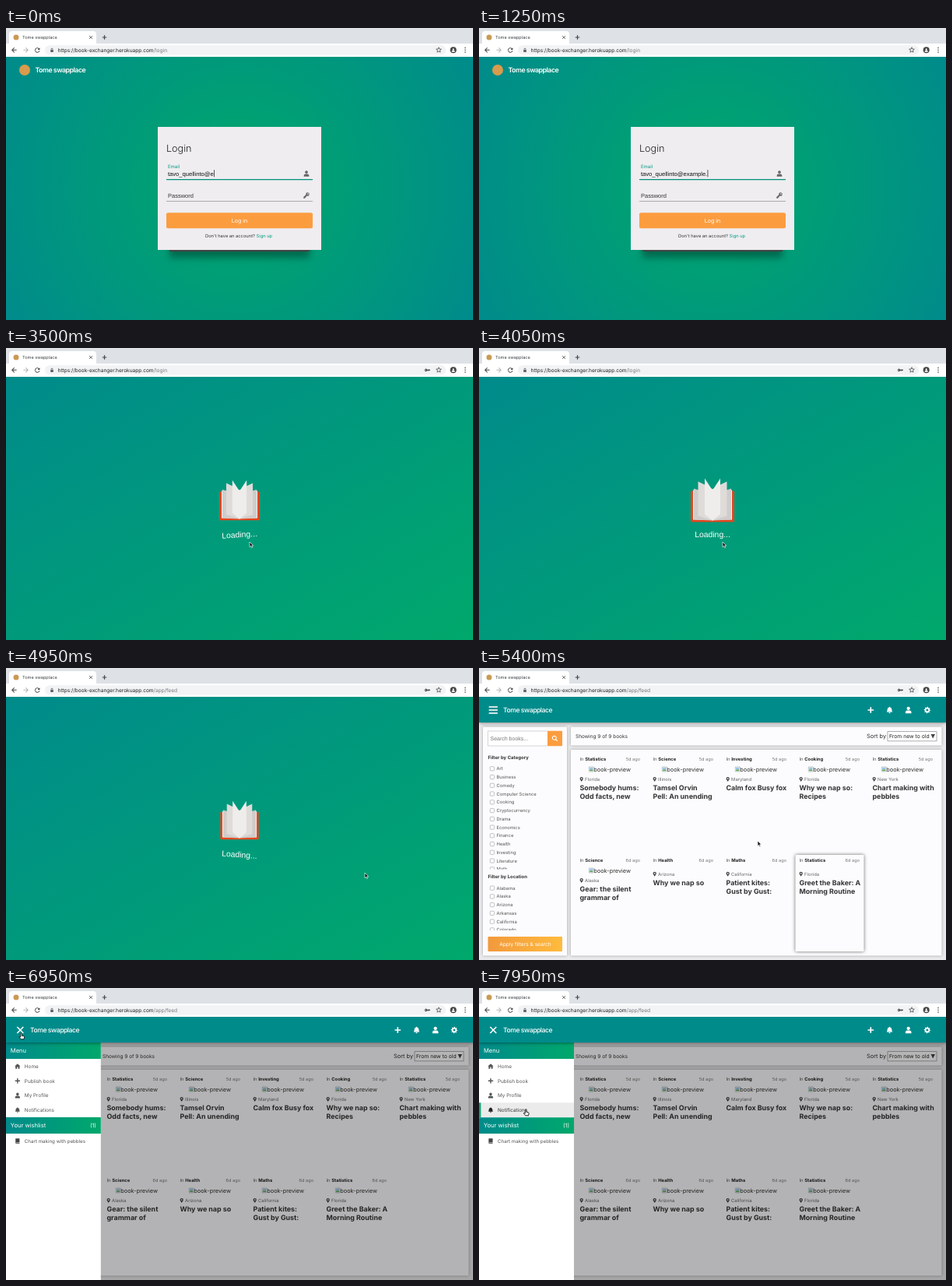
An HTML page with a canvas that plays this animation: 600x375 px, repeating every 8 s.

```html
<!DOCTYPE html>
<html lang="en">
<head>
<meta charset="utf-8">
<title>Tome swapplace</title>
<style>
html, body { margin: 0; width: 100%; height: 100%; overflow: hidden; }
canvas { display: block; width: 600px; height: 375px; }
</style>
</head>
<body>
<canvas id="stage"></canvas>
<script>
const LOOP = 8000;
const UI = 'Inter, sans-serif', FIELD = '"Liberation Sans", Arial, sans-serif';
const TEAL = '#008b8b', JADE = '#00a86b', ORANGE = '#fb9d3f', INK = '#333';
const BRAND = 'Tome swapplace', EMAIL = 'tavo_quellinto@example.com';

const canvas = document.getElementById('stage');
const c = canvas.getContext('2d');
const dpr = window.devicePixelRatio || 1;
canvas.width = 600 * dpr;
canvas.height = 375 * dpr;

const clamp = x => Math.max(0, Math.min(1, x));
const lerp = (a, b, p) => a + (b - a) * p;
const ease = x => { x = clamp(x); return x * x * (3 - 2 * x); };

const gearRim = Array.from({ length: 32 }, (_, i) => {
  const a = i * Math.PI / 16, r = i % 4 < 2 ? 5 : 3.7;
  return `${r * Math.cos(a)} ${r * Math.sin(a)}`;
}).join('L');
const starRim = Array.from({ length: 10 }, (_, i) => {
  const a = i * Math.PI / 5 - Math.PI / 2, r = i % 2 ? 2.2 : 5;
  return `${r * Math.cos(a)} ${r * Math.sin(a)}`;
}).join('L');

// Icons are drawn in a box from -5 to 5
const ICONS = {
  user: 'M0-5a2.5 2.5 0 1 1-.01 0zM-4.5 5V3.5q0-2.8 3-2.8h3q3 0 3 2.8V5z',
  bell: 'M0-5a.8.8 0 0 1 .8.9Q3.4-3.4 3.4-.5 3.4 2 4.4 3H-4.4Q-3.4 2-3.4-.5-3.4-3.4-.8-4.1A.8.8 0 0 1 0-5zM-1.3 3.6h2.6Q1.1 5 0 5T-1.3 3.6z',
  plus: 'M-1-4.5h2V-1h3.5v2H1v3.5h-2V1h-3.5v-2H-1z',
  home: 'M0-4.5L5.2 0H3.8V4.5H1V1.5h-2v3h-2.8V0h-1.4z',
  pin: 'M0 5C-1 3-3.6 1-3.6-1.5a3.6 3.6 0 0 1 7.2 0C3.6 1 1 3 0 5zM0-2.8a1.3 1.3 0 1 0 .01 0z',
  key: 'M2-5a3 3 0 1 1-1.2 5.8L-1 2.6v1.2h-1.3V5H-5V2.6L-.8-1.4A3 3 0 0 1 2-5zM2.6-3.6a1 1 0 1 0 .01 0z',
  gear: `M${gearRim}zM0-1.7a1.7 1.7 0 1 0 .01 0z`,
  star: `M${starRim}z`,
  search: 'M-1-5a4 4 0 1 0 .01 0zM-1-3.5a2.5 2.5 0 1 1-.01 0zM1.2 2.3l1.1-1.1L5 3.9 3.9 5z',
  lock: 'M-2.2-.5V-2a2.2 2.2 0 0 1 4.4 0v1.5H3v5h-6v-5zM-1.2-.5h2.4V-2a1.2 1.2 0 0 0-2.4 0z',
  book: 'M-4-4.5q0-.5.8-.5H4v8.2h-7V4h7v1h-7.2Q-4 5-4 4z',
  back: 'M4.5-.7v1.4h-6.8L.8 3.8l-1 1L-5 0l4.8-4.8 1 1-3.1 3.1z',
  reload: 'M4.5-4.5V-.4H.4l1.7-1.7A3.2 3.2 0 1 0 3 1.2h1.5A4.6 4.6 0 1 1 3.1-3.1z',
  arrow: 'M0 0v7l1.6-1.5L2.7 8l1.2-.5-1.1-2.4H5z',
  hand: 'M-.7 4.5V.1a.8.8 0 0 1 1.6 0v2.6l2.6.6q.7.3.6 1.1l-.6 2.9H-.3l-2.4-3q.5-1 2 .2z'
};
for (const name in ICONS) ICONS[name] = new Path2D(ICONS[name]);

function at(x, y, paint, scale = 1, angle = 0) {
  c.save();
  c.translate(x, y);
  c.rotate(angle);
  c.scale(scale, scale);
  paint();
  c.restore();
}

function icon(name, x, y, size, fill, stroke, width = 1) {
  at(x, y, () => {
    if (fill) { c.fillStyle = fill; c.fill(ICONS[name], 'evenodd'); }
    if (stroke) { c.strokeStyle = stroke; c.lineWidth = width; c.stroke(ICONS[name]); }
  }, size / 10);
}

// y is the middle of the capitals
function text(s, x, y, size, color, { weight = 400, font = UI, align = 'left', spacing = 0 } = {}) {
  c.font = `${weight} ${size}px ${font}`;
  c.letterSpacing = spacing + 'px';
  c.textAlign = align;
  c.fillStyle = color;
  c.fillText(s, x, y + size * .36);
  return c.measureText(s).width;
}

function rect(x, y, w, h, fill, radius = 0, stroke) {
  c.beginPath();
  c.roundRect(x, y, w, h, radius);
  if (fill) { c.fillStyle = fill; c.fill(); }
  if (stroke) { c.strokeStyle = stroke; c.lineWidth = .6; c.stroke(); }
}

function line(color, width, ...points) {
  c.beginPath();
  for (let i = 0; i < points.length; i += 2) c.lineTo(points[i], points[i + 1]);
  c.strokeStyle = color;
  c.lineWidth = width;
  c.stroke();
}

function dot(x, y, r, fill) {
  c.beginPath();
  c.arc(x, y, r, 0, 7);
  c.fillStyle = fill;
  c.fill();
}

function shadowed(color, blur, dy, paint) {
  c.save();
  c.shadowColor = color;
  c.shadowBlur = blur * dpr;
  c.shadowOffsetY = dy * dpr;
  paint();
  c.restore();
}

function gradient(g, from, to) {
  g.addColorStop(0, from);
  g.addColorStop(1, to);
  return g;
}

function browser(t) {
  rect(0, 0, 600, 20, '#dee1e6');
  rect(4, 4, 112, 20, '#fff', 4);
  rect(0, 20, 600, 17, '#fff');
  dot(13, 12, 3.5, '#c99a55');
  text(BRAND, 21, 12, 5.6, '#3c4043');
  line('#555', .8, 107, 10, 111, 14);
  line('#555', .8, 111, 10, 107, 14);
  icon('plus', 126.5, 12, 6, '#444');
  icon('back', 10.5, 28.3, 7, '#444');
  at(25.5, 28.3, () => icon('back', 0, 0, 7, '#b5b7ba'), 1, Math.PI);
  icon('reload', 40.3, 28.3, 7, '#444');
  rect(50, 22.3, 515, 12, '#f1f3f4', 6);
  icon('lock', 59, 28.3, 6, '#5f6368');
  const host = 'https://book-exchanger.herokuapp.com';
  const w = text(host, 66.5, 28.3, 6.57, '#222');
  text(t < 4450 ? '/login' : '/app/feed', 66.5 + w, 28.3, 6.57, '#77797d');
  if (t >= 2700) at(541, 28.3, () => icon('key', 0, 0, 5.8, '#444'), 1, Math.PI * 1.25);
  icon('star', 556, 28.3, 7, null, '#444', 1.1);
  dot(574.7, 28.3, 4, '#444');
  icon('user', 574.7, 28.5, 4.4, '#fff');
  for (const dy of [-2.8, 0, 2.8]) dot(590, 28.3 + dy, .8, '#444');
}

function loginPage(t) {
  rect(0, 37, 600, 338, gradient(c.createRadialGradient(300, 206, 0, 300, 206, 344), JADE, TEAL));
  dot(24, 54, 7, '#d99b4d');
  text(BRAND, 37.5, 54, 8.8, '#fff', { weight: 600, spacing: -.5 });
  shadowed('rgba(0,0,0,.35)', 9, 8, () => rect(210, 250, 180, 37, '#444'));
  rect(195, 127, 210, 158, '#efedf0');
  text('Login', 206, 154.5, 12.6, '#222', { weight: 300 });

  const typed = 16 + Math.floor(clamp((t - 50) / 1550) * 10);
  text('Email', 208, 177.5, 6, '#009b80');
  const emailWidth = text(EMAIL.slice(0, typed), 208, 187, 7.58, '#111', { font: FIELD });
  icon('user', 386, 187, 7.5, '#666');
  line('#008f78', 1.2, 206, 194.7, 394, 194.7);

  const focused = t >= 2250, float = ease((t - 2250) / 140);
  const labelColor = focused ? '#009b80' : INK;
  text('Password', 208, lerp(215.5, 209, float), lerp(7.5, 6.1, float), labelColor, { font: FIELD });
  const bullets = Math.floor(clamp((t - 2600) / 600) * 10);
  for (let i = 0; i < bullets; i++) dot(210 + i * 3.6, 216, 1.3, '#111');
  icon('key', 386, 215, 7.5, '#666');
  line(focused ? '#008f78' : '#999', focused ? 1.1 : .8, 206, 222.5, 394, 222.5);

  const typing = t < 1600 || t > 2600 && t < 3200;
  if (typing || (t - (focused ? 2250 : 1600)) % 1000 < 500) {
    if (focused) rect(208.4 + bullets * 3.6, 210, .7, 9, '#111');
    else rect(208.4 + emailWidth, 182.3, .7, 9, '#111');
  }

  rect(206, 237.3, 188, 20, ORANGE, 2);
  text('Log in', 300, 247.3, 7.1, '#fff', { align: 'center' });
  const w = text("Don't have an account? ", 256, 267, 5.75, INK);
  text('Sign up', 256 + w, 267, 5.75, '#009b80');
}

function loadingPage(t) {
  // Corner to corner, with the middle colour on the other diagonal
  const k = 600 * 338 / (600 ** 2 + 338 ** 2);
  rect(0, 37, 600, 338, gradient(
    c.createLinearGradient(300 - 338 * k, 206 - 600 * k, 300 + 338 * k, 206 + 600 * k), TEAL, JADE));
  const phase = (t - 4050) / 1800 * Math.PI * 2;
  const pages = [['#cfcccb', 24, -15, 3, -8, 25], ['#dedbd9', 18.5, -24, 6, -18, 20], ['#efedeb', 10, -28, 1.5, -15, 18]];
  at(300, 195.5, () => {
    rect(-28, -12, 56, 40, '#e5461f', 1);
    rect(-25, -13, 50, 38, '#f5f1ee');
    for (const [fill, x, top, inner, dip, bottom] of pages) {
      for (const side of [-1, 1]) {
        c.beginPath();
        c.moveTo(side * x, top);
        c.lineTo(side * inner, dip);
        c.lineTo(0, -14);
        c.lineTo(0, 26);
        c.lineTo(side * x, bottom);
        c.closePath();
        c.fillStyle = fill;
        c.fill();
      }
    }
  }, .94 + .06 * Math.cos(phase));
  at(300, 239.5, () => text('Loading...', 0, 0, 10.4, '#fff', { font: FIELD, align: 'center' }),
    1, Math.sin(phase / 2) * .075);
}

const CATEGORIES = ['Art', 'Business', 'Comedy', 'Computer Science', 'Cooking', 'Cryptocurrency', 'Drama',
  'Economics', 'Finance', 'Health', 'Investing', 'Literature', 'Math'];
const STATES = ['Alabama', 'Alaska', 'Arizona', 'Arkansas', 'California', 'Colorado'];
const BOOKS = [
  ['Statistics', 'Florida', 'Somebody hums:', 'Odd facts, new'],
  ['Science', 'Illinois', 'Tamsel Orvin', 'Pell: An unending'],
  ['Investing', 'Maryland', 'Calm fox Busy fox', ''],
  ['Cooking', 'Florida', 'Why we nap so:', 'Recipes'],
  ['Statistics', 'New York', 'Chart making with', 'pebbles'],
  ['Science', 'Alaska', 'Gear: the silent', 'grammar of'],
  ['Health', 'Arizona', 'Why we nap so', ''],
  ['Maths', 'California', 'Patient kites:', 'Gust by Gust:'],
  ['Statistics', 'Florida', 'Greet the Baker: A', 'Morning Routine']
];

function panel(x, y, w, h) {
  shadowed('rgba(0,0,0,.35)', 3.5, 0, () => rect(x, y, w, h, '#fcfbfd', 1));
}

function checklist(title, y, items, bottom) {
  text(title, 11.5, y, 6, INK, { weight: 700 });
  c.save();
  c.beginPath();
  c.rect(5, y, 108, bottom - y);
  c.clip();
  items.forEach((item, i) => {
    const rowY = y + 14.6 + i * 10.75;
    rect(14.3, rowY - 2.6, 5.2, 5.2, '#fff', 1, '#999');
    text(item, 22.5, rowY, 5.85, '#555');
  });
  c.restore();
}

function bookCard(t, [category, place, ...title], i) {
  const x = 129.5 + i % 5 * 94, y = i < 5 ? 0 : 130;
  if (i === 8) {
    c.save();
    c.globalAlpha = clamp((t - 5150) / 150) * clamp((5580 - t) / 150);
    shadowed('rgba(0,0,0,.6)', 4, 0, () => rect(406.5, 240, 88, 124, '#fcfbfd', 1));
    c.restore();
  }
  const w = text('In ', x, 116.5 + y, 5.9, '#555');
  text(category, x + w, 116.5 + y, 5.9, '#222', { weight: 700 });
  text(i < 5 ? '5d ago' : '6d ago', x + 77.5, 116.5 + y, 5.6, '#777', { align: 'right' });
  const hasPreview = t >= 5120 + i * 50;
  if (hasPreview) {
    rect(x + 11.8, 127 + y, 5.6, 6, '#fff', 0, '#9aa');
    rect(x + 12.6, 127.8 + y, 4, 2.4, '#9cc3ee');
    rect(x + 12.6, 130.4 + y, 4, 1.8, '#5aa55a');
    text('book-preview', x + 17.8, 130 + y, 7.35, INK);
  }
  const top = y - (hasPreview ? 0 : 8.3);
  icon('pin', x + 2.2, 143 + top, 6, '#444');
  text(place, x + 6.6, 143.2 + top, 5.85, '#666');
  title.forEach((row, n) => text(row, x, 154.2 + top + n * 10.4, 8.9, INK, { weight: 700 }));
}

const MENU = [['home', 'Home'], ['plus', 'Publish book'], ['user', 'My Profile'], ['bell', 'Notifications']];

function menu(open, pointer) {
  at(-122 * (1 - open), 0, () => {
    rect(0, 70, 122, 305, '#fff');
    const band = gradient(c.createLinearGradient(0, 0, 122, 0), TEAL, JADE);
    rect(0, 70, 122, 21, band);
    rect(0, 166, 122, 21, band);
    text('Menu', 6, 80.7, 7.6, '#fff');
    text('Your wishlist', 6, 176.7, 7.6, '#fff');
    text('(1)', 116, 176.5, 7, '#fff', { align: 'right' });
    MENU.forEach(([name, label], i) => {
      const y = 100.5 + i * 18.75;
      const hover = open === 1 && Math.abs(pointer.y - y) < 9.37;
      if (hover) {
        rect(0, y - 9.4, 122, 18.8, '#ebebeb');
        rect(0, y - 9.4, 2.4, 18.8, JADE);
      }
      icon(name, 15, y, 7, hover ? '#222' : '#555');
      text(label, 24, y, 6.4, hover ? '#333' : '#555');
    });
    icon('book', 15, 196.5, 6.5, '#444');
    text('Chart making with pebbles', 24, 196.5, 6.2, '#555');
  });
}

function feedPage(t, pointer) {
  rect(0, 37, 600, 338, '#ebeaec');
  panel(5, 75.5, 108, 294);
  panel(118, 75.5, 476.5, 24);
  panel(118, 105, 476.5, 264.5);

  rect(11.5, 81, 77, 19, '#fff', 0, '#bbb');
  text('Search books...', 14.5, 90.5, 7, '#777', { font: FIELD });
  rect(88, 80.8, 19, 19.4, ORANGE, 1);
  icon('search', 97.5, 90.5, 7.5, '#fff');
  checklist('Filter by Category', 114.7, CATEGORIES, 258.5);
  checklist('Filter by Location', 268, STATES, 337);
  rect(11.5, 345, 95.5, 19, gradient(c.createLinearGradient(11, 0, 107, 0), '#f2993c', '#ffbb3d'), 1);
  text('Apply filters & search', 59.5, 354.6, 6.6, '#fff', { align: 'center' });

  text('Showing 9 of 9 books', 124, 87.5, 6.5, INK);
  text('Sort by', 498, 87.5, 7.4, INK);
  rect(525, 81.5, 63, 12.3, '#fff', 0, '#777');
  text('From new to old', 527, 87.6, 6.8, '#222');
  c.beginPath();
  c.moveTo(580.5, 85); c.lineTo(586, 85); c.lineTo(583.2, 90.5);
  c.fillStyle = '#444';
  c.fill();
  BOOKS.forEach((book, i) => bookCard(t, book, i));

  const open = ease((t - 6500) / 460);
  rect(0, 70, 600, 305, `rgba(0,0,0,${.29 * open})`);
  if (open > 0) menu(open, pointer);

  shadowed('rgba(0,0,0,.4)', 4, 1, () => rect(0, 37, 600, 33, TEAL));
  for (const side of [-1, 0, 1]) {
    const fade = side ? 1 : 1 - open;
    at(18.3, 54 + side * 4 * (1 - open),
      () => line(`rgba(255,255,255,${fade})`, 1.6, -5.6, 0, 5.6, 0), 1, (side || 1) * -open * Math.PI / 4);
  }
  text(BRAND, 31, 54, 8.6, '#fff', { weight: 500, spacing: -.45 });
  ['plus', 'bell', 'user', 'gear'].forEach((name, i) => icon(name, 503.3 + i * 24.2, 54, 8.5, '#fff'));
}

// Pointer stops: time, x, y
const STOPS = [[1850, 340, 262], [2200, 234, 218], [3200, 234, 218], [3420, 313, 249], [4150, 313, 249],
  [4850, 461, 263], [5000, 461, 263], [5200, 452, 300], [5400, 358, 222], [5950, 19.5, 58.5],
  [7100, 19.5, 58.5], [7900, 60, 156.5], [8000, 60, 156.5]];

function pointerAt(t) {
  const i = Math.max(1, STOPS.findIndex(s => s[0] > t));
  const [t0, x0, y0] = STOPS[i - 1], [t1, x1, y1] = STOPS[i];
  const p = ease((t - t0) / (t1 - t0));
  return { x: lerp(x0, x1, p), y: lerp(y0, y1, p) };
}

function drawPointer(t, { x, y }) {
  if (t < 1850 || t > 2600 && t < 3200) return;
  const inField = t < 3500 && y > 203 && y < 223;
  const onButton = t < 3500 && y > 237 && y < 257;
  const onMenu = t > 5800 && (y < 66 && x < 28 || t > 6960 && y > 91 && y < 166);
  if (inField) {
    line('#222', .8, x - 1.6, y - 3.5, x, y - 3, x + 1.6, y - 3.5);
    line('#222', .8, x, y - 3, x, y + 3);
    line('#222', .8, x - 1.6, y + 3.5, x, y + 3, x + 1.6, y + 3.5);
  } else if (onButton || onMenu) {
    icon('hand', x, y, 10, '#fff', '#111', .9);
  } else {
    icon('arrow', x, y, 9.5, '#111', '#fff', .7);
  }
}

function draw(now) {
  const t = now % LOOP;
  const pointer = pointerAt(t);
  c.setTransform(dpr, 0, 0, dpr, 0, 0);
  c.textRendering = 'geometricPrecision';
  if (t < 3500) loginPage(t);
  else if (t < 5050) loadingPage(t);
  else feedPage(t, pointer);
  browser(t);
  drawPointer(t, pointer);
}

let start;
function tick(now) {
  start ??= now;
  draw(now - start);
  requestAnimationFrame(tick);
}
draw(0);
requestAnimationFrame(tick);
</script>
</body>
</html>
```
